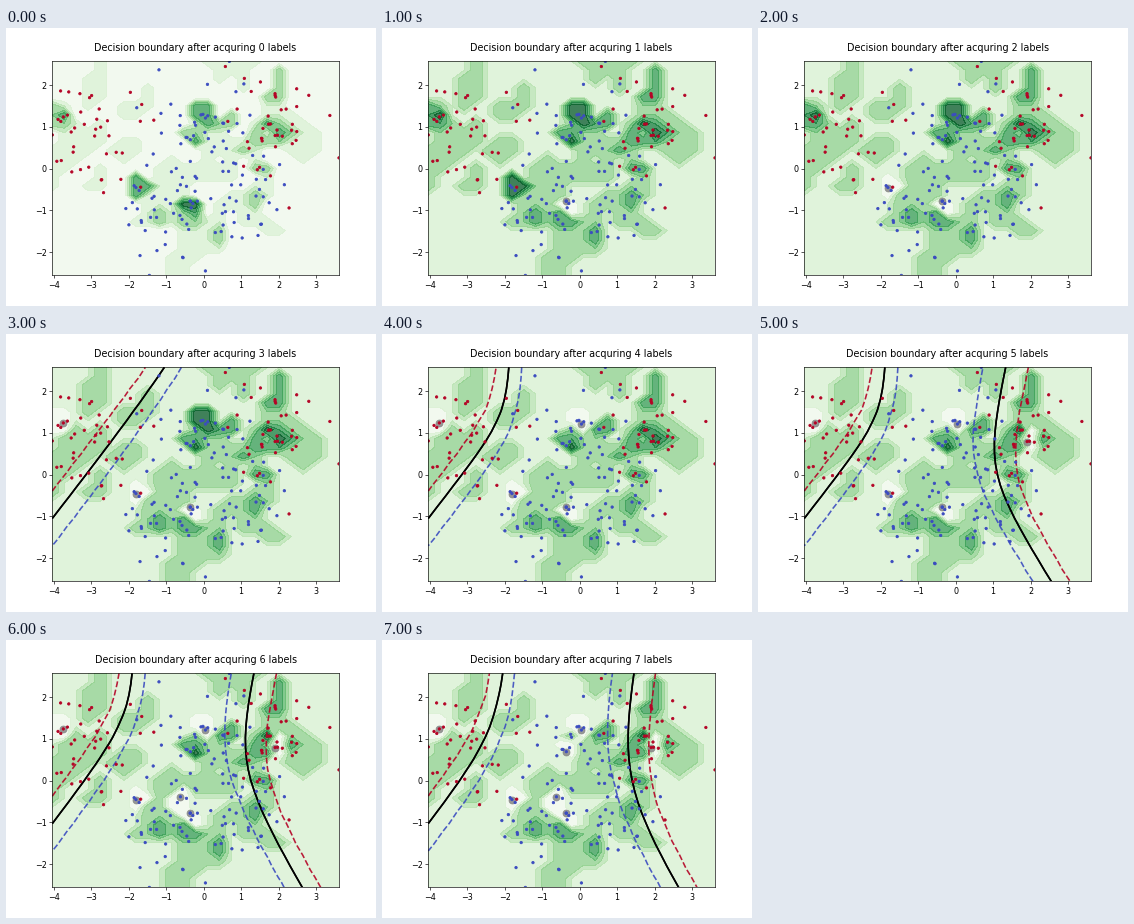
Animation, 370 px wide and 278 px high, one loop 8 s. Source, as a matplotlib script:

```python
import numpy as np
import matplotlib.pyplot as plt
from matplotlib.animation import FuncAnimation

DPI = 57.8125
RADIUS = 0.2
GAMMA = 0.5
CENTERS = [(0, 1), (-3, 0.5), (-1, -1), (2, 1), (1, -0.5)]
# Approximate places of the queried samples, in query order
QUERIES = [(-0.37, -0.79), (-1.80, -0.465), (-3.76, 1.21), (0.047, 1.212),
           (1.92, 0.80), (-0.621, -0.387), (-0.357, 0.693)]

plt.rcParams["font.family"] = "DejaVu Sans"

rng = np.random.RandomState(0)
X = np.concatenate([rng.normal(c, 0.7, size=(40, 2)) for c in CENTERS])
labels = np.repeat(np.arange(len(CENTERS)), 40) % 2
low, high = X.min(axis=0), X.max(axis=0)
cool, warm = plt.cm.coolwarm(0.0), plt.cm.coolwarm(1.0)


def distances(a, b):
    return np.linalg.norm(a[:, None] - b[None], axis=2)


def mesh(res):
    xs, ys = (np.linspace(low[i], high[i], res) for i in (0, 1))
    gx, gy = np.meshgrid(xs, ys)
    return gx, gy, np.column_stack([gx.ravel(), gy.ravel()])


near = distances(X, X) <= RADIUS


def coverage_gain(picked):
    """Number of still uncovered samples inside each sample's ball."""
    covered = near[picked].any(axis=0)
    return (near & ~covered).sum(axis=1)


def choose_samples():
    picked = []
    for q in QUERIES:
        gap = distances(X, np.array([q]))[:, 0]
        picked.append(int(np.argmax(coverage_gain(picked) - 8 * gap)))
    return picked


picks = choose_samples()
ux, uy, upoints = mesh(25)
nearest = distances(upoints, X).argmin(axis=1)
bx, by, bpoints = mesh(21)


def draw_utilities(ax, picked):
    gain = coverage_gain(picked).astype(float)
    ax.contourf(ux, uy, gain[nearest].reshape(ux.shape),
                cmap="Greens", alpha=0.75)


def draw_boundary(ax, picked):
    kinds = labels[picked]
    if len(set(kinds)) < 2:
        return
    kernel = np.exp(-GAMMA * distances(bpoints, X[picked]) ** 2)
    prob = kernel[:, kinds == 1].sum(axis=1) / kernel.sum(axis=1)
    prob = prob.reshape(bx.shape)
    for p, color in ((1 - prob, cool), (prob, warm)):
        ax.contour(bx, by, 2 * p - 1, [0], colors="k", linewidths=2, zorder=1)
        ax.contour(bx, by, p, [0.75], colors=[color], linewidths=2,
                   linestyles="--", alpha=0.9, zorder=1)


fig, ax = plt.subplots(figsize=(6.4, 4.80865), dpi=DPI)


def draw(step):
    ax.clear()
    picked = picks[:step]
    draw_utilities(ax, picked)
    ax.scatter(*X[picked].T, c="grey", alpha=0.8, marker=".", s=300)
    draw_boundary(ax, picked)
    ax.scatter(*X.T, c=labels, cmap="coolwarm", marker=".", zorder=2)
    ax.text(0.5, 1.05, f"Decision boundary after acquring {step} labels",
            size=12, ha="center", transform=ax.transAxes)
    ax.set_xlim(low[0], high[0])
    ax.set_ylim(low[1], high[1])
    return []


anim = FuncAnimation(fig, draw, frames=8, interval=1000,
                     init_func=lambda: draw(0), repeat=True)
plt.show()
```
